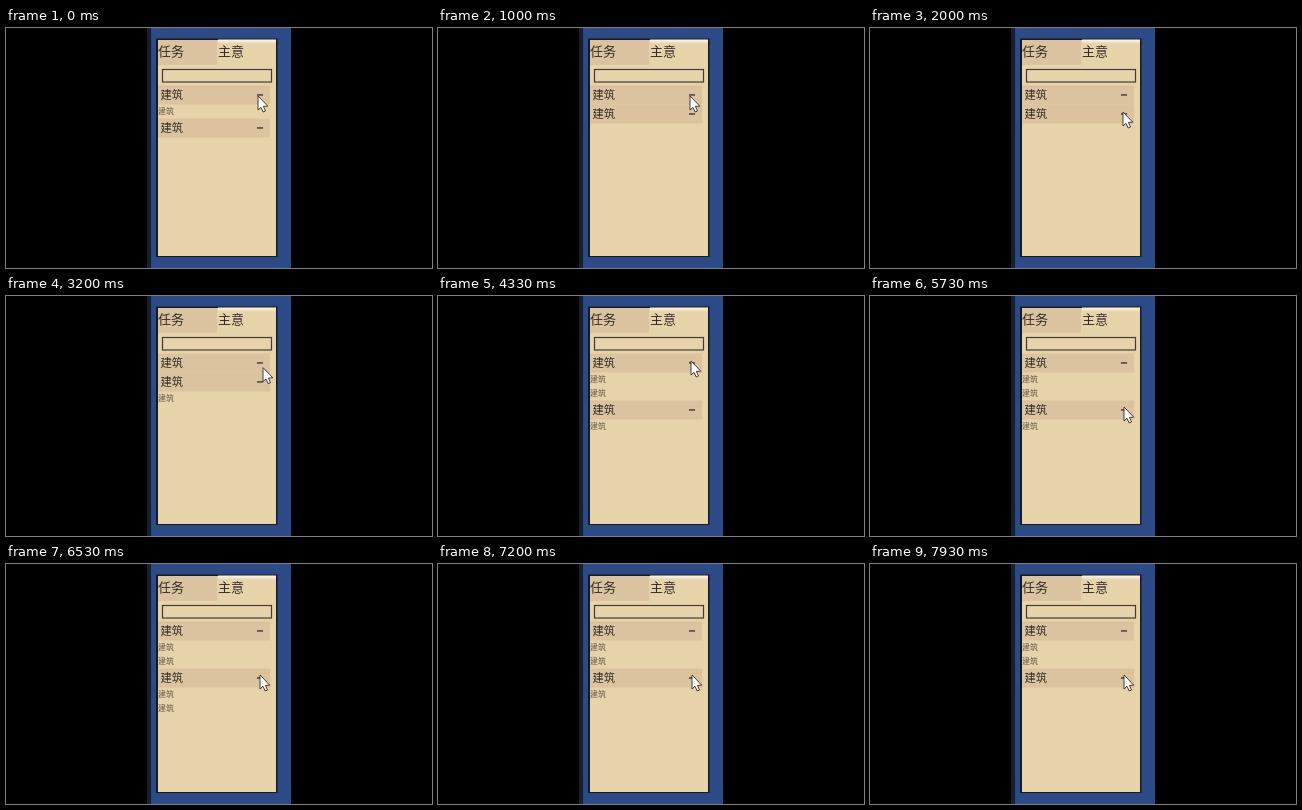
Write an HTML page with a canvas that moves like this. It is 426 px wide and 240 px high and loops after 8 s.

```html
<!DOCTYPE html>
<html lang="zh-CN">
<head>
<meta charset="utf-8">
<title>任务</title>
<style>
html, body { margin: 0; width: 100%; height: 100%; overflow: hidden; background: #000; }
canvas { display: block; width: 100vw; height: 100vh; }
</style>
</head>
<body>
<canvas width="426" height="240"></canvas>
<script>
const ctx = document.querySelector('canvas').getContext('2d');
const LOOP = 8000;
const HEADER = 19, ITEM = 14, LIST_TOP = 57.5;
const INK = '#332d29', FAINT = '#69594a', BAND = '#dbc3a0', PAPER = '#e6d3aa';

// Number of the given moments that have passed at time t
const passed = (t, ...times) => times.filter(at => t >= at).length;

// Smooth progress from 0 to 1 between two moments
function ease(t, from, to) {
  const u = Math.min(1, Math.max(0, (t - from) / (to - from)));
  return u * u * (3 - 2 * u);
}

function rect(color, x, y, w, h) {
  ctx.fillStyle = color;
  ctx.fillRect(x, y, w, h);
}

function label(text, x, middle, size, color = INK) {
  ctx.font = `${size}px "Noto Sans CJK SC", "Noto Sans CJK", sans-serif`;
  ctx.fillStyle = color;
  ctx.fillText(text, x, middle + size * 0.37);
}

function panel() {
  rect('#000', 0, 0, 426, 240);
  rect('#17202a', 141, 0, 4, 240);
  rect('#2c4b86', 145, 0, 140, 240);
  rect('#171a20', 150, 10.5, 121.5, 218.5);
  rect(PAPER, 152, 12, 118, 216);
  rect(BAND, 152, 12, 59, 25);

  const shine = ctx.createLinearGradient(0, 11.5, 0, 16);
  shine.addColorStop(0, '#fffbea');
  shine.addColorStop(1, PAPER);
  rect(shine, 212, 11.5, 58, 4.5);

  label('任务', 152, 23.5, 13);
  label('主意', 212, 23.5, 13);
  ctx.strokeStyle = '#453b30';
  ctx.lineWidth = 1.2;
  ctx.strokeRect(156.5, 41.5, 109, 12.5);
}

// Draws a header with its items and returns where the next group starts
function group(top, count) {
  rect(BAND, 152, top, 112, HEADER);
  label('建筑', 154.5, top + 9.5, 11.3);
  rect(INK, 251, top + 8.8, 6, 1.3);
  for (let i = 0; i < count; i++) {
    label('建筑', 152, top + 26 + i * ITEM, 8, FAINT);
  }
  return top + HEADER + count * ITEM;
}

function pointer(x, y) {
  ctx.save();
  ctx.translate(x, y);
  const arrow = new Path2D('M0 0V14L3 11.3L5.2 16L7.5 15L5.4 10.4L9.8 10.2Z');
  ctx.fillStyle = '#fff';
  ctx.strokeStyle = '#302b28';
  ctx.lineWidth = 0.9;
  ctx.fill(arrow);
  ctx.stroke(arrow);
  ctx.restore();
}

function draw(t) {
  const first = 1 - passed(t, 930) + passed(t, 3600, 4130);
  const second = passed(t, 2600, 6130) - passed(t, 7000, 7600);
  panel();
  group(group(LIST_TOP, first), second);

  // Down to the second header, back up in an arc, then down again
  const down = ease(t, 1200, 1850);
  const back = ease(t, 2750, 3500);
  const again = ease(t, 4700, 5500);
  pointer(
    252 + down + 4.5 * Math.sin(Math.PI * back) + again,
    68 + 16 * down - 19 * back + 46 * again
  );
}

function tick() {
  draw(performance.now() % LOOP);
  requestAnimationFrame(tick);
}
tick();
</script>
</body>
</html>
```
